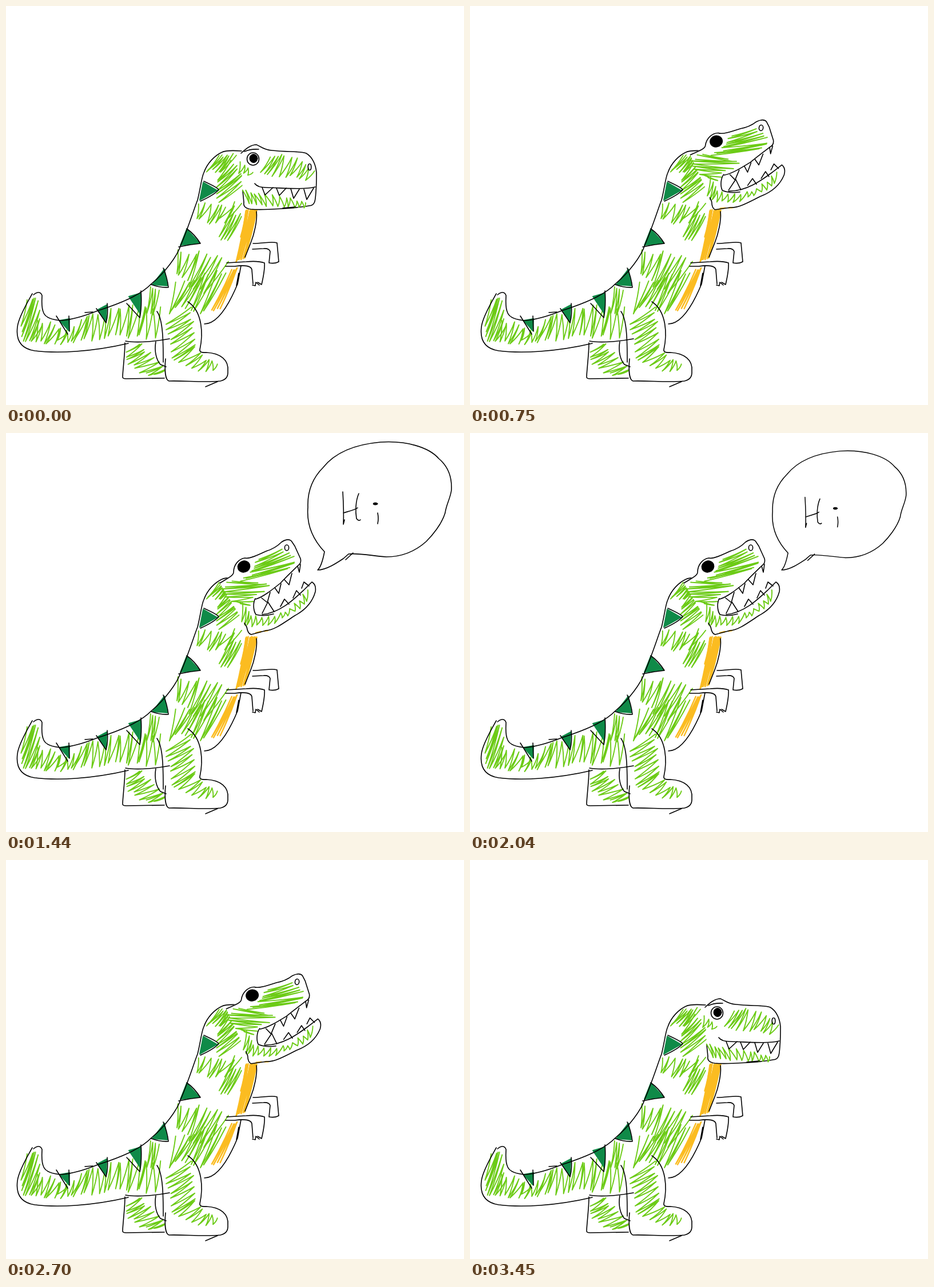
Write an HTML page that moves like this. It is 801 px wide and 699 px high and loops after 3.48 s.

```html
<!DOCTYPE html>
<html lang="en">
<head>
<meta charset="utf-8">
<title>Dinosaur says hi</title>
<style>
html, body { margin: 0; width: 100%; height: 100%; overflow: hidden; background: #fff; }
svg { display: block; width: 100%; height: 100%; }
path, ellipse { fill: none; stroke-linecap: round; stroke-linejoin: round; }
.ink { stroke: #000; stroke-width: 1.6; }
.skin { fill: #fff; }
.dot { fill: #000; stroke: #000; }
.green { stroke: #6ccb16; stroke-width: 1.9; }
.yellow { stroke: #fbbc21; stroke-width: 2.4; }
.spike { fill: #0f8a48; stroke: #0f8a48; stroke-width: 2; }
</style>
</head>
<body>
<svg viewBox="0 0 801 699">
  <g id="body"></g>
  <g id="closed"></g>
  <g id="open"></g>
  <g id="bubble"></g>
</svg>
<script>
const LOOP = 3480, STEP = 30;
const $ = id => document.getElementById(id);
let seed = 11;
const rand = () => (seed = (seed * 16807) % 2147483647) / 2147483647 - 0.5;

function add(group, tag, cls, attrs) {
  const el = document.createElementNS('http://www.w3.org/2000/svg', tag);
  el.setAttribute('class', cls);
  for (const k in attrs) el.setAttribute(k, attrs[k]);
  $(group).append(el);
}
const path = (group, cls, d) => add(group, 'path', cls, { d });
const ink = (group, d) => path(group, 'ink', d);
const oval = (group, cls, cx, cy, rx, ry, turn = 0) =>
  add(group, 'ellipse', cls, { cx, cy, rx, ry, transform: `rotate(${turn} ${cx} ${cy})` });

// Point at fraction u along a flat list of x, y pairs.
function along(pts, u) {
  const last = pts.length / 2 - 1;
  const i = Math.min(last - 1, Math.floor(u * last)), f = u * last - i;
  return [0, 1].map(k => pts[2 * i + k] * (1 - f) + pts[2 * i + 2 + k] * f);
}

// Hand-drawn zigzag running between two edges.
function hatch(group, cls, a, b, n, wobble = 6) {
  let d = '', px, py;
  for (let i = 0; i <= 2 * n; i++) {
    let [x, y] = along(i % 2 ? b : a, i / (2 * n));
    x += rand() * wobble;
    y += rand() * wobble;
    if (i) d += `Q${((px + x) / 2 + 2).toFixed(1)} ${((py + y) / 2 + 1).toFixed(1)} `;
    else d += 'M';
    d += `${x.toFixed(1)} ${y.toFixed(1)}`;
    px = x; py = y;
  }
  path(group, cls, d);
}

// Body
const fur = (...args) => hatch('body', 'green', ...args);
fur([40, 515, 56, 512, 62, 560], [27, 560, 30, 585, 50, 590], 7);
fur([60, 552, 105, 570, 150, 540, 210, 525, 268, 530], [45, 588, 95, 590, 140, 584, 200, 578, 262, 582], 25, 9);
fur([252, 492, 266, 498], [245, 540, 262, 540], 3);
fur([300, 430, 345, 432, 385, 450], [293, 468, 322, 488, 345, 500], 9, 10);
fur([300, 485, 345, 472, 382, 465], [283, 535, 310, 530, 354, 538], 9, 10);
fur([340, 345, 365, 345, 390, 350, 412, 345], [327, 372, 350, 380, 372, 376, 388, 380], 8, 8);
fur([392, 362, 413, 366], [372, 405, 390, 412], 4);
fur([372, 264, 402, 260], [348, 290, 378, 288], 6);
fur([392, 272, 410, 288, 412, 312], [372, 298, 368, 322, 374, 348], 7, 8);
fur([322, 530, 328, 560, 328, 592, 345, 618, 370, 625], [280, 550, 286, 585, 292, 620, 322, 636, 366, 642], 14);
fur([232, 590, 245, 605, 272, 628, 276, 640], [209, 605, 214, 625, 235, 643, 266, 648], 10);

const gold = (...args) => hatch('body', 'yellow', ...args);
gold([420, 358, 438, 358], [401, 448, 417, 440], 8, 3);
gold([419, 358, 437, 358], [408, 405, 427, 405], 8, 3);
gold([396, 463, 406, 460], [356, 535, 378, 528], 4, 4);

[
  'M345 309L369 323L339 340Z',
  'M316 391L338 415L305 419Z',
  'M277 461L282 490L256 488Z',
  'M215 509L236 503L235 539Z',
  'M161 532L176 524L175 552Z',
  'M94 551L111 548L110 569Z'
].forEach(d => path('body', 'spike', d));

[
  'M346 307Q370 318 372 322Q364 331 340 342',
  'M316 390Q330 400 340 416Q320 418 302 422',
  'M275 459Q282 475 284 493Q270 494 254 488',
  'M211 521L234 546Q238 525 236 499',
  'M158 530L175 555Q179 540 177 521',
  'M88 543L108 575M110 543L111 570',
  'M46 504C38 518 22 545 20 562C17 585 25 600 50 604C90 609 150 606 214 591',
  'M48 506Q59 497 63 507C63 515 61 528 66 538C70 547 82 550 97 551C120 549 140 542 160 534' +
    'C200 521 235 507 255 486C277 468 300 438 306 418C320 385 330 352 335 340' +
    'C341 315 342 300 346 292C352 275 365 262 378 256Q386 252 412 254',
  'M138 537L152 536',
  'M208 590C208 610 204 640 204 650Q204 653 210 653L277 652',
  'M209 587C230 591 265 587 286 583',
  'M262 588C259 605 263 620 270 628L280 632',
  'M264 535C275 550 275 590 275 624',
  'M279 618C277 640 279 655 285 657C310 656 350 660 375 657Q389 654 388 640' +
    'C390 620 375 608 350 607Q338 608 339 602C345 575 344 535 318 518',
  'M349 667L370 658',
  'M438 360C440 375 434 400 428 415L418 440',
  'M347 557C365 557 385 535 405 487L411 455M403 490L407 468',
  'M432 416C450 416 465 412 474 415L477 448Q470 452 460 450L462 430Q460 424 450 425L431 426',
  'M386 450L420 448Q440 446 452 450C453 462 450 475 447 488L440 484M443 489L437 484L436 490L431 489',
  'M384 456L400 456Q428 452 430 462L432 487'
].forEach(d => ink('body', d));

// Head with the mouth shut
path('closed', 'ink skin', 'M411 258C420 250 428 243 438 243C446 246 450 252 465 253C490 256 515 254 525 258' +
  'C537 265 542 280 543 292C543 300 543 315 542 325C541 340 541 350 530 350' +
  'C510 354 450 358 428 356Q414 354 416 344L414 324');
hatch('closed', 'green', [462, 262, 482, 262, 515, 270, 537, 292], [442, 290, 465, 296, 500, 300, 527, 303], 10);
hatch('closed', 'green', [414, 322, 440, 330, 490, 335, 525, 345], [420, 345, 450, 350, 490, 352, 525, 353], 12, 4);
hatch('closed', 'green', [411, 270, 432, 290], [402, 290, 425, 300], 3);
[
  'M417 255Q428 250 442 251',
  'M435 311Q440 318 455 318C490 319 520 322 541 317',
  'M448 318L453 331L467 318M473 319L478 332L490 319M498 320L503 337L513 321M521 321L526 339L538 319',
  'M484 354L506 352'
].forEach(d => ink('closed', d));
oval('closed', 'ink', 432, 268, 10.5, 11);
oval('closed', 'dot', 433, 267, 7, 7.5);
oval('closed', 'ink', 531, 282, 2.8, 5.5);

// Head with the mouth open
path('open', 'skin', 'M374 263L398 246L420 219L482 191L499 189L515 220L512 232L535 261L541 278L505 320L455 346L424 353L417 333Z');
hatch('open', 'green', [440, 222, 432, 236, 428, 250, 412, 260], [478, 203, 497, 212, 505, 226, 488, 242], 9);
hatch('open', 'green', [394, 260, 376, 274, 382, 290, 408, 300], [440, 260, 462, 266, 436, 284, 430, 302], 9, 8);
hatch('open', 'green', [416, 300, 430, 322, 470, 322, 500, 305, 530, 275], [408, 330, 430, 340, 465, 335, 505, 314, 532, 292], 14, 5);
path('open', 'yellow', 'M437 350L446 348M452 347L458 346');
[
  'M374 263C385 256 398 250 398 244C398 230 408 220 418 219C425 221 440 214 455 207' +
    'C465 204 475 198 482 191Q493 184 499 189L505 198L515 220Q517 228 511 232' +
    'C500 243 490 252 480 263C465 275 450 287 437 291',
  'M436 290C432 297 432 310 437 318Q450 322 468 317',
  'M448 318C480 315 505 290 522 274Q530 266 535 261Q543 266 541 278C535 300 520 312 505 320' +
    'C485 333 470 345 455 346L429 353Q423 352 421 340L417 333',
  'M447 289L457 297L462 279M470 271L477 281L481 264M487 257L495 266L500 246M510 233L513 244L515 230',
  'M448 316L458 296L469 313M480 304L487 291L495 300M502 289L508 276L515 284M517 272L521 261L530 268'
].forEach(d => ink('open', d));
oval('open', 'dot', 416, 234, 11, 10, -20);
oval('open', 'ink', 491, 201, 3.6, 5);

// Speech bubble
path('bubble', 'ink skin', 'M557 208C540 190 525 165 528 130C527 105 535 80 555 60C575 35 610 20 655 16' +
  'C700 13 740 25 757 45C775 60 780 80 779 100C777 115 770 125 768 140C762 160 745 180 735 190' +
  'C715 208 690 217 665 217C640 215 615 210 599 212L590 220C578 228 560 240 545 240Q552 234 557 208');
[
  'M607 210L594 222',
  'M589 103C590 120 591 140 590 160L592 152M590 140C600 137 612 134 615 131',
  'M617 106C611 120 611 138 613 150Q617 155 620 152',
  'M650 140Q652 150 650 159'
].forEach(d => ink('bubble', d));
oval('bubble', 'dot', 646, 124, 4, 2);

// Time and value pairs, linear in between.
const shutTurn = [[0, 0], [510, -13.6], [2940, -13.6], [3450, 0]];
const openTurn = [[510, 13], [1030, 0], [2438, 0], [2940, 13.4]];
const growth = [[1000, 0], [1440, 1], [2010, 1], [2440, 0]];

function at(keys, t) {
  if (t <= keys[0][0]) return keys[0][1];
  for (let i = 1; i < keys.length; i++) {
    const [t0, v0] = keys[i - 1], [t1, v1] = keys[i];
    if (t <= t1) return v0 + (v1 - v0) * (t - t0) / (t1 - t0);
  }
  return keys[keys.length - 1][1];
}

const show = (id, on) => $(id).setAttribute('visibility', on ? 'visible' : 'hidden');

function draw(now) {
  const t = Math.floor((now % LOOP) / STEP) * STEP;
  const roar = t >= 510 && t < 2940;
  const size = at(growth, t);
  show('closed', !roar);
  show('open', roar);
  show('bubble', size > 0);
  $('closed').setAttribute('transform', `rotate(${at(shutTurn, t)} 417 295)`);
  $('open').setAttribute('transform', `rotate(${at(openTurn, t)} 398 355)`);
  $('bubble').setAttribute('transform', `translate(545 240) scale(${size}) translate(-545 -240)`);
}

const start = performance.now();
function tick() {
  draw(performance.now() - start);
  requestAnimationFrame(tick);
}
tick();
</script>
</body>
</html>
```
